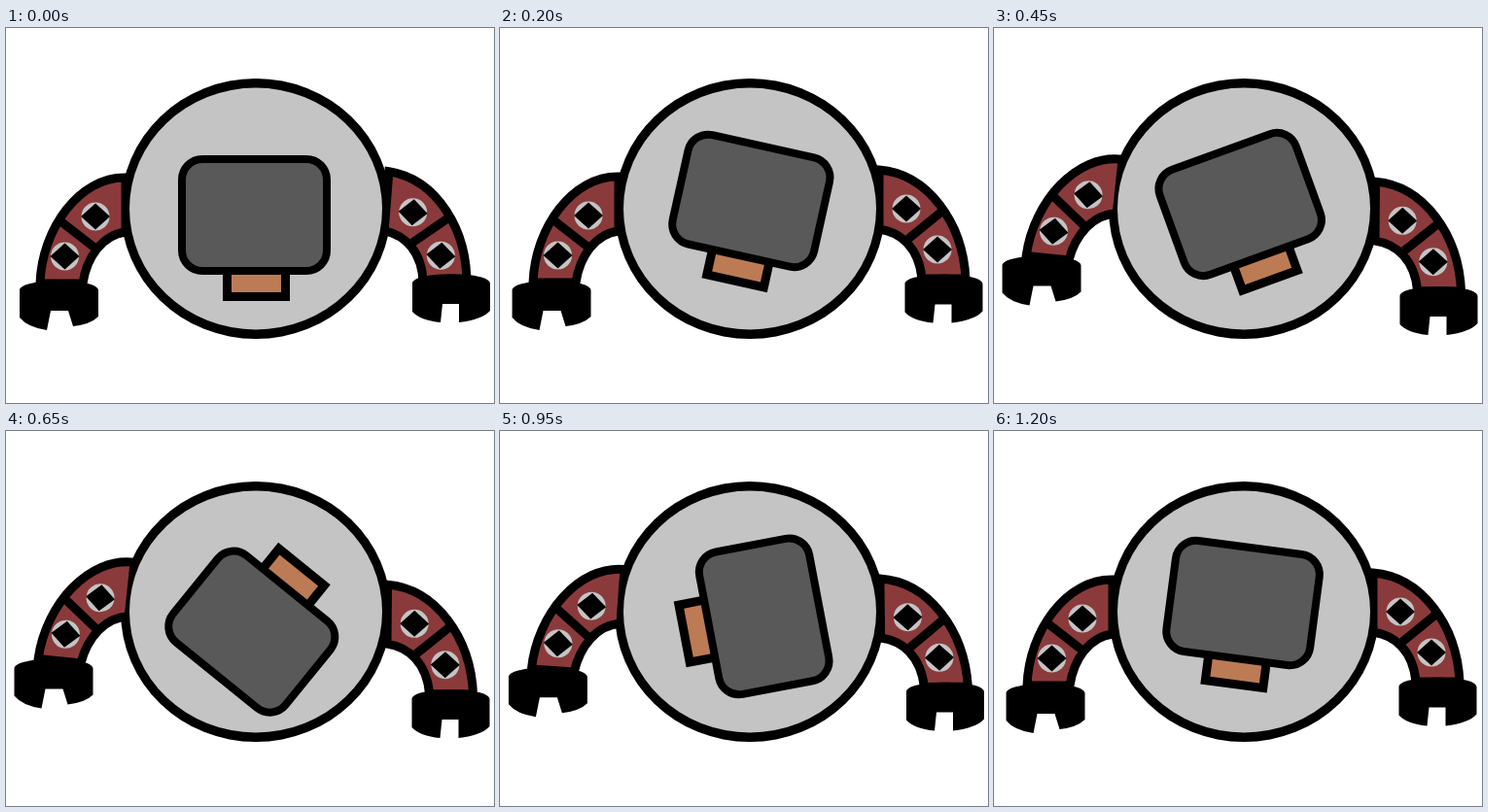
An HTML page with a canvas for the animation above (1250 ms loop, 502 by 386 pixels).

```html
<!DOCTYPE html>
<html lang="en">
<head>
<meta charset="utf-8">
<title>Robot</title>
<style>
  html, body { margin: 0; width: 100%; height: 100%; overflow: hidden; background: #fff; }
  canvas { display: block; }
</style>
</head>
<body>
<canvas id="stage" width="502" height="386"></canvas>
<script>
const ctx = document.getElementById('stage').getContext('2d');
const STEP = 50, STEPS = 25;
const GREY = '#c4c4c4', RED = '#8b3a3b', SCREEN = '#595959', ORANGE = '#bc7b54';

// Each key: step, angle in degrees, pivot x, pivot y
const headKeys = [
  [1, 3, 255, 191], [4, 12.5, 255.4, 191.1], [7, 19, 256.5, 192.5],
  [9, -20, 257.8, 194.2], [13, -141, 261.3, 196.1], [16, -220, 259.5, 192.8],
  [21, -316, 257.5, 193.7], [24, -352.5, 254.3, 190.4]
];
const headRest = [0, 255.5, 206];

// Each pose: arm x, y, angle, then hand x, y
const leftPoses = {
  rest: [1, 1, 0, 0, 0], ready: [0, 0, 0, -1.5, 0],
  swing: [4, -23, 6, -5.5, -25.5], settle: [-0.5, -0.5, 1, -4, -3]
};
const rightPoses = {
  rest: [-1, 5, 4.5, 0, 0], ready: [0, 0, 0, -1.5, 0.5],
  swing: [2, 12.5, 0.5, -0.5, 13], settle: [1, -1.5, -2, 0.5, -2]
};
const timing = [[0, 'rest'], [1, 'ready'], [5, 'ready'], [9, 'swing'],
                [17, 'swing'], [21, 'settle'], [22, 'ready'], [24, 'ready']];
const armKeys = poses => timing.map(([step, name]) => [step, ...poses[name]]);

const leftArm = {
  keys: armKeys(leftPoses),
  center: [75, 213.5],
  shape: new Path2D('M122 153C75 152 36 205 34 262L78 262C82 235 98 212 122 209Z'),
  divider: new Path2D('M54 197L90 225'),
  joints: [[91, 193], [59.5, 234]],
  hand: new Path2D('M14 270C14 257 95 257 95 270V297Q87 305 69 307L64 291H46L42 311Q22 308 14 298Z')
};
const rightArm = {
  keys: armKeys(rightPoses),
  center: [434, 207],
  shape: new Path2D('M390 146C440 150 476 200 479 258L434 258C431 226 412 210 390 207Z'),
  divider: new Path2D('M420 217L458 186'),
  joints: [[418, 186], [450, 228]],
  hand: new Path2D('M418 263C418 250 498 250 498 263V291Q490 300 466 303V284H449L447 303Q426 301 418 292Z')
};

// Smooth interpolation that never overshoots the keys
function sample(keys, step) {
  let i = keys.findIndex(key => key[0] > step) - 1;
  if (i < 0) return keys[keys.length - 1].slice(1);
  const rate = (k, c) => keys[k + 1] && keys[k]
    ? (keys[k + 1][c] - keys[k][c]) / (keys[k + 1][0] - keys[k][0]) : null;
  const slope = (k, c) => {
    const before = rate(k - 1, c), after = rate(k, c);
    if (before === null) return after;
    if (after === null) return before;
    if (before * after <= 0) return 0;
    return (keys[k + 1][c] - keys[k - 1][c]) / (keys[k + 1][0] - keys[k - 1][0]);
  };
  const from = keys[i], to = keys[i + 1], span = to[0] - from[0];
  const u = (step - from[0]) / span, v = 1 - u;
  return from.slice(1).map((a, n) => {
    const c = n + 1;
    return a * v * v * (1 + 2 * u) + to[c] * u * u * (3 - 2 * u)
      + span * u * v * (v * slope(i, c) - u * slope(i + 1, c));
  });
}

function place(x, y, degrees, draw) {
  ctx.save();
  ctx.translate(x, y);
  ctx.rotate(degrees * Math.PI / 180);
  draw();
  ctx.restore();
}

function ellipse(x, y, rx, ry, color) {
  ctx.fillStyle = color;
  ctx.beginPath();
  ctx.ellipse(x, y, rx, ry, 0, 0, Math.PI * 2);
  ctx.fill();
}

function box(x, y, w, h, r, color, line) {
  ctx.beginPath();
  ctx.roundRect(x, y, w, h, r);
  ctx.fillStyle = color;
  ctx.fill();
  ctx.lineWidth = line;
  ctx.stroke();
}

function drawJoint([x, y]) {
  ellipse(x, y, 14.5, 14.5, GREY);
  ctx.fillStyle = '#000';
  ctx.beginPath();
  ctx.moveTo(x - 15, y);
  ctx.lineTo(x, y - 13.5);
  ctx.lineTo(x + 15, y);
  ctx.lineTo(x, y + 13.5);
  ctx.fill();
}

function drawArm(arm, step) {
  const [x, y, angle, handX, handY] = sample(arm.keys, step);
  const [cx, cy] = arm.center;
  place(cx + x, cy + y, angle, () => {
    ctx.translate(-cx, -cy);
    ctx.fillStyle = RED;
    ctx.fill(arm.shape);
    ctx.lineWidth = 9;
    ctx.stroke(arm.shape);
    ctx.stroke(arm.divider);
    arm.joints.forEach(drawJoint);
  });
  place(handX, handY, 0, () => {
    ctx.fillStyle = '#000';
    ctx.fill(arm.hand);
  });
}

function drawHead(step) {
  const [angle, x, y] = step ? sample(headKeys, step) : headRest;
  place(x, y, angle, () => {
    box(-28, 40, 60, 30.5, 0, ORANGE, 9);
    box(-74.5, -71, 149, 115, 21, SCREEN, 8);
  });
}

function render(now) {
  const step = Math.floor(now / STEP) % STEPS;
  ctx.fillStyle = '#fff';
  ctx.fillRect(0, 0, 502, 386);
  ctx.strokeStyle = '#000';
  ellipse(257, 186, 139, 134, '#000');
  drawArm(leftArm, step);
  drawArm(rightArm, step);
  ellipse(257, 186, 130, 124.5, GREY);
  drawHead(step);
  requestAnimationFrame(render);
}
render(0);
</script>
</body>
</html>
```
